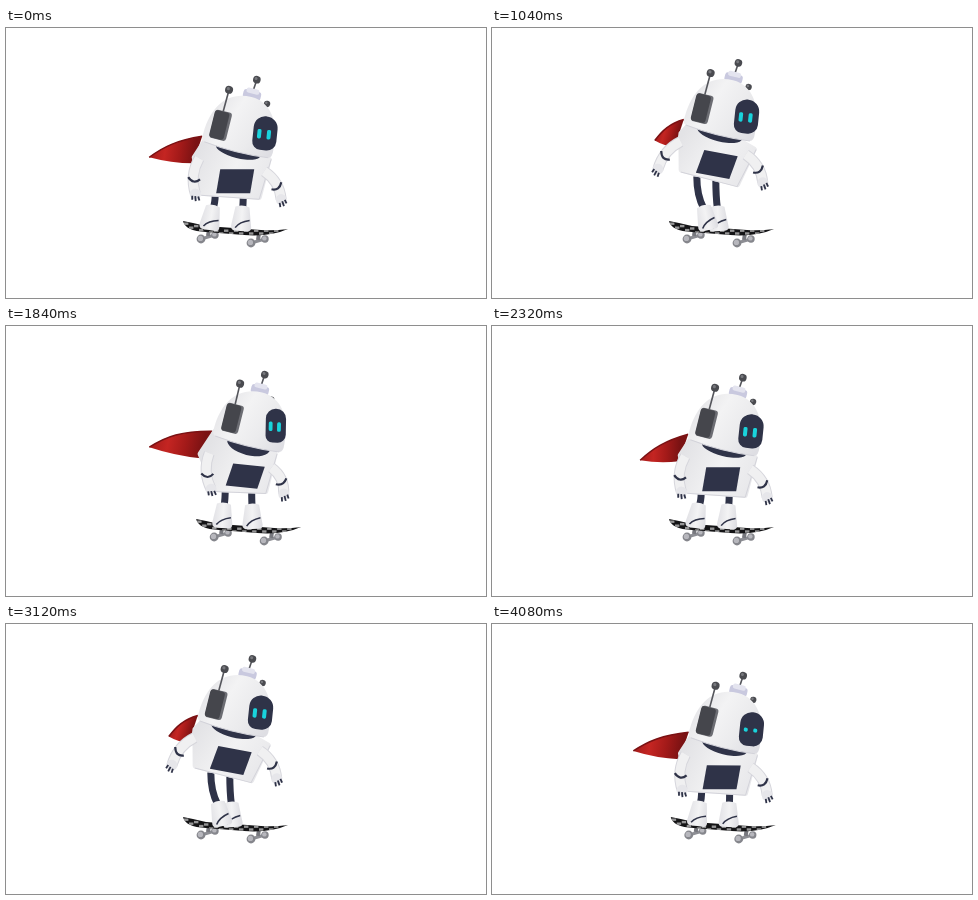
Recreate the animation shown at these times as an HTML page with a canvas. Size 480 by 270 pixels, loop 4.16 s.

```html
<!DOCTYPE html>
<html lang="en">
<head>
<meta charset="utf-8">
<title>Skateboarding robot</title>
<style>
html, body { margin: 0; width: 100%; height: 100%; overflow: hidden; background: #fff; }
canvas { display: block; width: 480px; height: 270px; }
</style>
</head>
<body>
<canvas id="stage" width="480" height="270"></canvas>
<script>
const ctx = document.getElementById('stage').getContext('2d');
const STEP = 80, PUSH = 2080;
const NAVY = '#2f3348', WHITE = '#f0f0f1', SHADE = '#d3d3da', GREY = '#55565c';
const RAD = Math.PI / 180;

const mix = (a, b, u) => a + (b - a) * u;
const add = (p, x, y) => [p[0] + x, p[1] + y];

// Soft rise to 1 at the peak and fall back to 0.
function bump(t, peak, rise, fall) {
  const u = (t - peak) / (t < peak ? rise : fall);
  return Math.abs(u) < 1 ? (1 + Math.cos(u * Math.PI)) / 2 : 0;
}

// The whole figure follows from a few overlapping movements of one push.
function poseAt(t) {
  const lean = bump(t, 720, 400, 320);
  const lift = bump(t, 960, 560, 360);
  const step = bump(t, 1040, 240, 240);
  const push = bump(t, 1360, 200, 160);
  const trail = bump(t, 1540, 180, 300);
  const hop = bump(t, 1600, 220, 400);
  const turn = bump(t, 1540, 460, 500);
  const stream = bump(t, 1400, 300, 600);
  const slide = bump(t, 1250, 750, 780);
  const glide = 28 * bump(t, 1580, 400, 500);
  const flutter = 5 * Math.sin(t / PUSH * 4 * Math.PI);

  const tilt = 14 + 7 * lean;
  const cap = [246 + 23 * turn + 8 * lean - 5 * lift, 67 - 19 * lift - 9 * hop + 3 * push];
  const chest = add(cap, -57 * Math.sin(tilt * RAD) - 3 + 6 * turn - 7 * push,
    57 * Math.cos(tilt * RAD) + 31);
  const shoulderL = add(chest, -36, -23);
  const shoulderR = add(chest, 29 - 8 * turn, -10 + 4 * turn);

  return {
    cap, tilt, turn, chest, glide,
    bodyTilt: 12 * lift + 6 * lean,
    armL: { from: shoulderL, angle: 6 + 38 * lift - 26 * turn + 18 * push, length: 36, side: -1 },
    armR: { from: shoulderR, angle: 31 - 18 * turn - 16 * push, length: 33 - 11 * turn, side: 1 },
    legL: {
      hip: add(chest, -20, 12),
      foot: [203 + glide - 7 * lean + 14 * step - 28 * (push + trail), 201 + 13 * push - 12 * trail]
    },
    legR: { hip: add(chest, mix(8, -3, slide), 14), foot: [235 + glide - 10 * slide, 202] },
    cape: {
      tip: add(chest, -86 - 20 * lean - 30 * stream + 24 * step + flutter,
        -24 + 22 * lean - 37 * push + flutter),
      top: add(chest, -33, -45 - 12 * push),
      low: add(chest, -42 - 8 * turn, -18 + 12 * lean),
      arch: 5 + 10 * lean + 10 * stream,
      dip: push
    },
    blink: t >= 1920
  };
}

function fill(color) { ctx.fillStyle = color; ctx.fill(); }

function line(color, width, draw) {
  ctx.beginPath();
  draw();
  ctx.strokeStyle = color;
  ctx.lineWidth = width;
  ctx.stroke();
}

function disc(x, y, rx, color, ry = rx) {
  ctx.beginPath();
  ctx.ellipse(x, y, rx, ry, 0, 0, 7);
  fill(color);
}

function rounded(x, y, w, h, r, color) {
  ctx.beginPath();
  ctx.roundRect(x - w / 2, y - h / 2, w, h, r);
  fill(color);
}

function blend(x0, y0, x1, y1, ...colors) {
  const g = ctx.createLinearGradient(x0, y0, x1, y1);
  colors.forEach((c, i) => g.addColorStop(i / (colors.length - 1), c));
  return g;
}

function poly(points) {
  ctx.beginPath();
  points.forEach(p => ctx.lineTo(...p));
  ctx.closePath();
}

function within([x, y], degrees, draw) {
  ctx.save();
  ctx.translate(x, y);
  ctx.rotate(degrees * RAD);
  draw();
  ctx.restore();
}

function drawBoard() {
  for (const [x, y] of [[202, 207], [252, 211]]) {
    line('#8d8e94', 3, () => { ctx.moveTo(x - 7, y + 4); ctx.lineTo(x + 7, y); });
    line('#77787e', 4, () => { ctx.moveTo(x, y + 1); ctx.lineTo(x + 1, y - 6); });
    for (const [wx, wy, r] of [[x + 7, y, 3.7], [x - 7, y + 4, 4.4]]) {
      disc(wx, wy, r, '#85868c');
      disc(wx - .6, wy - .6, r * .6, '#b7b7bd');
    }
  }
  ctx.beginPath();
  ctx.moveTo(177, 193);
  ctx.quadraticCurveTo(188, 195, 200, 198);
  ctx.lineTo(255, 202);
  ctx.quadraticCurveTo(268, 203, 282, 201);
  ctx.quadraticCurveTo(264, 209, 238, 207);
  ctx.lineTo(200, 204);
  ctx.quadraticCurveTo(179, 203, 177, 193);
  fill('#141416');
  ctx.clip();
  ctx.fillStyle = 'rgba(205,205,205,.7)';
  for (let i = 0; i < 21; i++) {
    ctx.fillRect(178 + i * 5, 194.5 + Math.min(i * 1.2, 7) + (i % 2) * 2.8, 4.4, 2.4);
  }
}

function drawCape({ tip, top, low, arch, dip }) {
  const [x, y] = tip;
  const edge = () => {
    const at = (u, rise) => [mix(x, top[0], u), mix(y, top[1], u) - rise];
    ctx.moveTo(x, y);
    ctx.bezierCurveTo(...at(.27, arch - 28 * dip), ...at(.52, arch * 1.2 - 12 * dip), ...top);
  };
  ctx.beginPath();
  edge();
  ctx.lineTo(...low);
  ctx.quadraticCurveTo((x + low[0]) / 2, (y + low[1]) / 2 + 3 + 5 * dip, x, y);
  fill(blend(x, y, ...low, '#a51c1b', '#c42522', '#a31a19', '#7a1213'));
  line('#7a1113', 1.5, edge);
}

function drawLeg({ hip: [hx, hy], foot: [fx, fy] }) {
  const reach = Math.hypot(hx - fx, hy - fy), len = 23;
  const kx = mix(fx, hx, len / reach), ky = mix(fy, hy, len / reach);
  line(NAVY, 7, () => {
    ctx.moveTo(hx, hy);
    ctx.quadraticCurveTo((hx + kx) / 2 + (hx - kx) * .5, (hy + ky) / 2 + 4, kx, ky + 2);
  });
  within([kx, ky], Math.atan2(fy - ky, fx - kx) / RAD - 90, () => {
    ctx.beginPath();
    ctx.moveTo(-7, 0);
    ctx.quadraticCurveTo(0, -3, 7, 0);
    ctx.lineTo(10, len - 3);
    ctx.quadraticCurveTo(10, len + 1, 6, len + 1);
    ctx.lineTo(-7, len + 1);
    ctx.quadraticCurveTo(-11, len, -10, len - 5);
    ctx.closePath();
    fill(blend(-10, 0, 10, 0, '#e2e2e6', '#f3f3f4', '#dcdce1'));
    line(NAVY, 1.6, () => {
      ctx.moveTo(-6, len - 2);
      ctx.quadraticCurveTo(-2, len - 8, 8, len - 10);
    });
  });
}

function drawBody(turn) {
  const front = [[-28, -44], [34, -22], [24, 16], [-34, 12], [-41, -24]];
  const side = [[-35, -46], [22, -23], [14, 14], [-22, 16], [-53, -19]];
  const shape = front.map((p, i) => p.map((v, k) => mix(v, side[i][k], turn)));
  const paint = blend(-41, -20, 30, 14, '#e3e3e6', '#f2f2f3', '#e7e7ea');
  poly(shape);
  fill(paint);
  ctx.lineJoin = 'round';
  ctx.strokeStyle = paint;
  ctx.lineWidth = 5;
  ctx.stroke();
  line(SHADE, 1, () => {
    ctx.moveTo(shape[3][0], shape[3][1] + 2);
    ctx.lineTo(shape[2][0], shape[2][1] + 2);
    ctx.lineTo(shape[1][0] + 2, shape[1][1]);
  });

  ctx.transform(1, .3 * turn, -.17 - .5 * turn, 1, 0, 0);
  const w = 34 - 7 * turn, h = 24 - 6 * turn;
  ctx.fillStyle = NAVY;
  ctx.fillRect(-w / 2, -h / 2, w, h);
}

function drawArm({ from, angle, length, side }) {
  // Local frame: the arm hangs down, outward is along the side.
  within(from, -side * angle, () => {
    const path = () => {
      ctx.moveTo(0, 0);
      ctx.quadraticCurveTo(side * 8, length * .5, 0, length);
    };
    line('#d6d6dc', 11, path);
    line(WHITE, 9, path);
    line(NAVY, 2.2, () => {
      ctx.moveTo(side * 9, length * .55);
      ctx.quadraticCurveTo(side * 3, length * .75, -side * 3, length * .58);
    });
    disc(0, length, 5.5, '#e6e6ea');
    for (let i = -1; i < 2; i++) {
      line(NAVY, 1.8, () => {
        ctx.moveTo(i * 3, length + 2);
        ctx.lineTo(i * 3.6 - side, length + 7 - Math.abs(i));
      });
    }
  });
}

function antenna(x0, y0, x1, y1, r) {
  line(GREY, 1.6, () => { ctx.moveTo(x0, y0); ctx.lineTo(x1, y1); });
  disc(x1, y1, r, '#4a4b50');
  disc(x1 - 1, y1 - 1, r * .4, '#77787d');
}

function drawNeck(turn) {
  disc(7 * turn, 57 - 3 * turn, 23 - 3 * turn, NAVY, 8 + 7 * turn);
}

function drawVisor(turn, blink) {
  const w = 24 - 11 * turn;
  ctx.beginPath();
  ctx.roundRect(-w / 2, -17, w, 34, [w * .48, w * .5, w * .4, w * .35]);
  fill(NAVY);
  for (const s of [-1, 1]) {
    rounded(s * (4.8 - 1.8 * turn) - 1, 1 + s * turn, 4 - .5 * turn, blink ? 4 : 9.5, 1.6, '#19d3dc');
  }
}

function drawHead(turn, blink) {
  const left = -38 + 8 * turn, right = 34 + 8 * turn, low = 57 - 4 * turn;
  const mid = (left + right) / 2;
  antenna(15, 16, 16.7 - 10 * turn, 5 + 5 * turn, 3.2);
  antenna(0, -3, 1, -16, 3.8);
  rounded(0, 0, 18, 9, 3, '#c9c9df');
  rounded(0, -4, 13, 5, 2, '#e4e4ef');

  const rim = () => {
    ctx.moveTo(left + 3, low);
    ctx.quadraticCurveTo(mid, low + 4, right - 3, low);
  };
  ctx.beginPath();
  rim();
  ctx.quadraticCurveTo(right + 1, low - 1, right, low - 9);
  ctx.bezierCurveTo(right - 1, 20, right - 14, 2, mid + 2, 2);
  ctx.bezierCurveTo(left + 14, 2, left + 1, 20, left, low - 9);
  ctx.quadraticCurveTo(left - 1, low - 1, left + 3, low);
  fill(blend(left, 20, right, 45, '#e4e4e7', '#f3f3f4', '#ebebed', '#dedee3'));
  line(SHADE, 1, rim);

  within([22 + 6 * turn, 34 - 9 * turn], -8 - 14 * turn, () => drawVisor(turn, blink));

  const ex = -24 + 10 * turn, ey = 37 - 8 * turn;
  antenna(ex, ey - 12, -23.5 + 8 * turn, .5 - 5 * turn, 4);
  rounded(ex + 1, ey, 17, 29, 3, '#6c6d73');
  rounded(ex - .5, ey, 15, 28, 3, '#45464c');
}

function draw(t) {
  const p = poseAt(t);
  ctx.clearRect(0, 0, 480, 270);
  within([p.glide, 0], 0, drawBoard);
  drawCape(p.cape);
  drawLeg(p.legR);
  drawLeg(p.legL);
  within(p.chest, p.bodyTilt, () => drawBody(p.turn));
  within(p.cap, p.tilt, () => drawNeck(p.turn));
  drawArm(p.armR);
  drawArm(p.armL);
  within(p.cap, p.tilt, () => drawHead(p.turn, p.blink));
}

const start = performance.now();
function tick() {
  const now = (performance.now() - start) % PUSH;
  draw(Math.floor(now / STEP) * STEP);
  requestAnimationFrame(tick);
}
tick();
</script>
</body>
</html>
```
